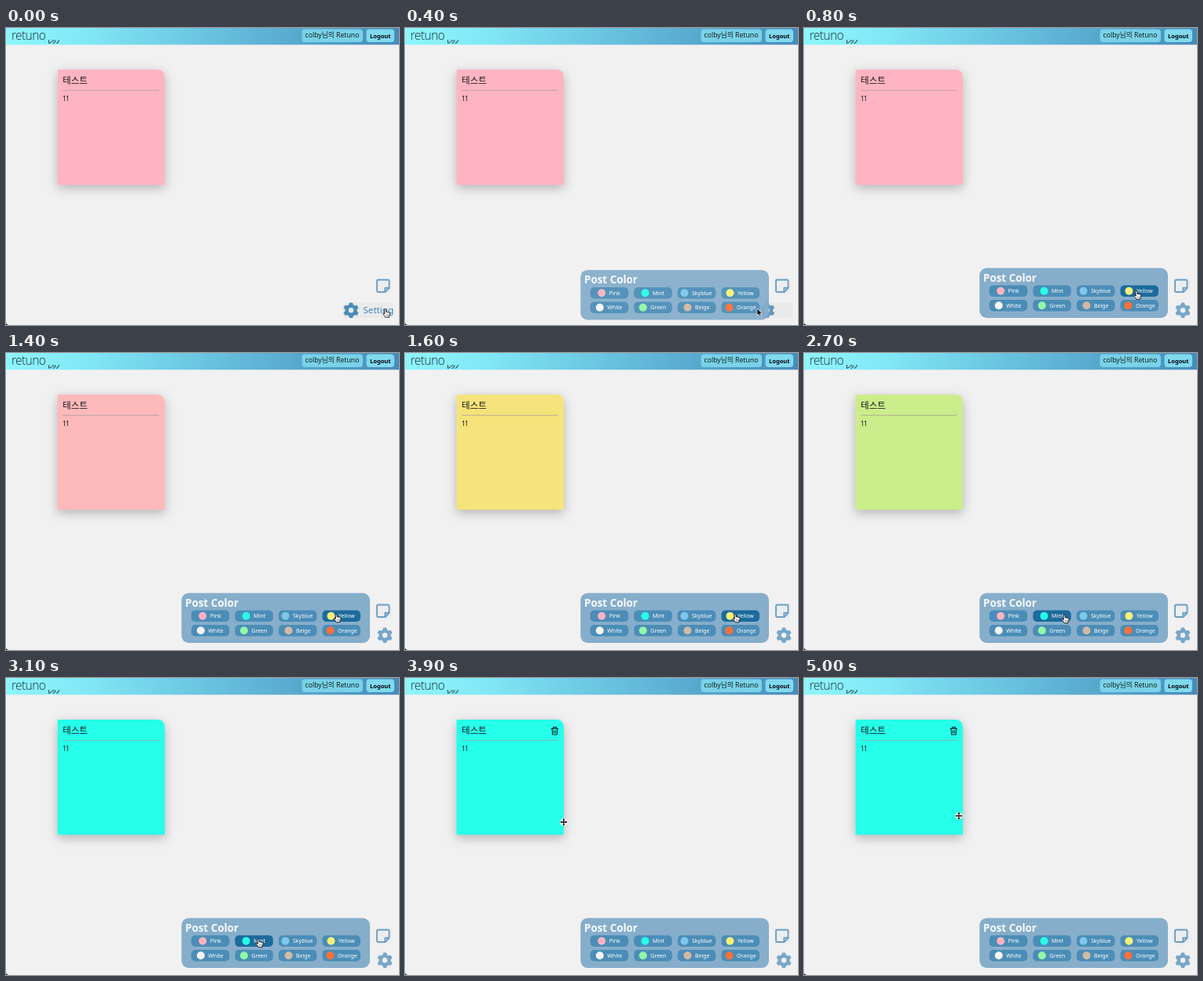
These frames come from a looping animation (500x378 px, 5.1 s). An HTML page:

```html
<!DOCTYPE html>
<html lang="ko">
<head>
<meta charset="utf-8">
<title>Sticky notes</title>
<style>
  html, body { margin: 0; width: 100%; height: 100%; overflow: hidden; background: #f2f1f2; }
  svg { display: block; width: 100vw; height: 100vh; }
  text { font-family: "Noto Sans", "Noto Sans CJK KR", "Noto Sans CJK", sans-serif; white-space: pre; }
  #note { filter: drop-shadow(0 4px 7px rgba(0, 0, 0, .26)); }
  .logo { font: 300 15.5px "Open Sans", Lato, sans-serif; letter-spacing: -.6px; fill: #17303a; }
  .kana { font: 700 6px "Noto Sans CJK JP", "Noto Sans CJK", sans-serif; letter-spacing: -1px; fill: #10242c; }
  .label { font-size: 7px; fill: #fff; }
</style>
</head>
<body>
<svg viewBox="0 0 500 378" xmlns="http://www.w3.org/2000/svg">
  <defs>
    <linearGradient id="bar">
      <stop offset="0" stop-color="#8ff5fd"/>
      <stop offset=".2" stop-color="#82e8f6"/>
      <stop offset=".6" stop-color="#62b9d9"/>
      <stop offset="1" stop-color="#478bb9"/>
    </linearGradient>
  </defs>
  <rect width="500" height="378" fill="#f2f1f2"/>

  <rect width="500" height="21.3" fill="url(#bar)"/>
  <text class="logo" x="7" y="15">retuno</text>
  <text class="kana" x="53" y="19.2">レツノ</text>
  <rect x="376.5" y="1.5" width="77.5" height="16.5" rx="4" fill="#79d2e8"/>
  <text x="415" y="12.3" font-size="8.7" text-anchor="middle" fill="#122">colby님의 Retuno</text>
  <rect x="458.5" y="1.5" width="35.5" height="16.5" rx="4" fill="#80daee"/>
  <text x="476.3" y="12.5" font-size="7.5" font-weight="600" text-anchor="middle" fill="#001">Logout</text>

  <path id="note" d="M65.6 53H192.5Q202 53 202 62.5V199.6H65.6Z"/>
  <text x="72" y="70.6" font-size="11.6" fill="#181818">테스트</text>
  <path d="M72 79.3H194.6" stroke="#a09a9a" stroke-opacity=".7"/>
  <text x="72" y="93.2" font-size="8.3" letter-spacing="-.8" fill="#181818">11</text>
  <g id="trash" fill="none" stroke="#0b2b2b" stroke-width="1.1">
    <path d="M185.8 64.5H195.2M188.5 64.3V62.6H192.5V64.3M187.2 64.8L187.7 72H193.3L193.8 64.8M189.5 66.5V70.3M191.5 66.5V70.3"/>
  </g>

  <rect x="469" y="318" width="22" height="21" rx="6" fill="#e9ebed" opacity=".7"/>
  <path d="M473.5 320.5H486Q487.5 320.5 487.5 322V331L482.5 336H473.5Q472 336 472 334.5V322Q472 320.5 473.5 320.5ZM487.5 330.8H482.3V336" fill="none" stroke="#6c9fc3" stroke-width="1.9" stroke-linejoin="round"/>

  <rect id="pill" y="349.5" height="20" rx="7" fill="#e9e9ea"/>
  <text id="setting" y="363.2" font-size="11.6" fill="#4185b6">Setting</text>
  <g id="gear" fill="#4a8bb8"></g>

  <g id="panel">
    <rect x="223.3" y="305.5" width="239.7" height="63.5" rx="9" fill="#86aecb"/>
    <text x="228" y="322.8" font-size="13.4" font-weight="600" fill="#f8fbfd">Post Color</text>
  </g>

  <path d="M0 375Q.3 377.7 4 378H0Z" fill="#111"/>

  <g id="cursor">
    <g id="arrow">
      <path d="M0 0V8.7L2 7 3.3 10 4.9 9.3 3.6 6.4H6.3Z" stroke="#fff" stroke-width=".7"/>
    </g>
    <g id="hand">
      <path d="M-1.2 1Q-1.2 0 -.2 0 .8 0 .9 1L1.3 4Q2 3.4 2.9 4.2 3.8 3.7 4.5 4.6 6 4.3 6.1 5.7 6.2 8 5 9.2V10.7H.2Q-.7 8.7 -2.8 6.7 -3.2 5.6 -2 5.5L-.5 6.5Z" fill="#fff" stroke="#111" stroke-width=".9" stroke-linejoin="round"/>
      <path d="M1.5 7V9M3 7V9M4.4 7V9" stroke="#222" stroke-width=".5"/>
    </g>
    <g id="move">
      <circle r="4.6" fill="#fff"/>
      <path d="M-4 0H4M0 -4V4" stroke="#000" stroke-width="1.2"/>
      <path d="M0 -4.4L1.6 -2.4H-1.6ZM0 4.4L1.6 2.4H-1.6ZM-4.4 0L-2.4 -1.6V1.6ZM4.4 0L2.4 -1.6V1.6Z"/>
    </g>
  </g>
</svg>
<script>
const LOOP = 5100;
const PINK = [255, 181, 193], YELLOW = [244, 233, 116], MINT = [38, 255, 233];
// name, dot colour, left edge of the label
const swatches = [
  ['Pink', '#f8b3c1', 259.7], ['Mint', '#26ffe9', 315], ['Skyblue', '#7dc8ea', 365], ['Yellow', '#f8f178', 423],
  ['White', '#f4f4f4', 257.3], ['Green', '#92f8a8', 312.3], ['Beige', '#d2b9a3', 369], ['Orange', '#ff7038', 422]
];
// time, x, y of the pointer tip
const pointerPath = [
  [0, 482.5, 357.5], [150, 482.5, 357.5], [400, 448, 357], [900, 420, 332], [1800, 420, 332],
  [2500, 331, 333], [2750, 331, 333], [3050, 321, 332], [3250, 321, 332],
  [4000, 196, 176], [4400, 196, 176], [4500, 197, 175.5], [LOOP, 197, 175.5]
];

const $ = id => document.getElementById(id);
const progress = (t, start, end) => Math.min(1, Math.max(0, (t - start) / (end - start)));
const smooth = u => u * u * (3 - 2 * u);
const easeOut = u => 1 - (1 - u) ** 2;
const mix = (a, b, u) => a + (b - a) * u;
const mixColor = (a, b, u) => a.map((v, i) => mix(v, b[i], u));
const show = (id, visible) => $(id).setAttribute('display', visible ? 'inline' : 'none');

function set(el, attrs) {
  for (const name in attrs) el.setAttribute(name, attrs[name]);
}

function add(parent, tag, attrs, text = '') {
  const el = document.createElementNS('http://www.w3.org/2000/svg', tag);
  set(el, attrs);
  el.textContent = text;
  return parent.appendChild(el);
}

const buttons = swatches.map(([name, color, textX], i) => {
  const x = 235.7 + (i % 4) * 55.6, y = i < 4 ? 327.5 : 346;
  const el = add($('panel'), 'rect', { x, y, width: 48.5, height: 14.5, rx: 5 });
  add($('panel'), 'circle', { cx: textX - 9.5, cy: y + 7.3, r: 5, fill: color });
  add($('panel'), 'text', { x: textX, y: y + 9.6, class: 'label' }, name);
  return { el, x, y };
});

add($('gear'), 'circle', { r: 5.4, fill: 'none', stroke: '#4a8bb8', 'stroke-width': 4.4 });
for (let i = 0; i < 6; i++)
  add($('gear'), 'path', { d: 'M-2.9 -6.5L-2 -9.8H2L2.9 -6.5Z', transform: `rotate(${i * 60})` });

function pointerAt(t) {
  const i = pointerPath.findIndex(p => p[0] > t);
  const [t0, x0, y0] = pointerPath[i - 1], [t1, x1, y1] = pointerPath[i];
  const u = smooth(progress(t, t0, t1));
  return [mix(x0, x1, u), mix(y0, y1, u)];
}

function render(t) {
  const [x, y] = pointerAt(t);

  const open = easeOut(progress(t, 100, 500));
  set($('panel'), { opacity: open, transform: `translate(0 ${40 * (1 - open)})` });

  const wide = 1 - smooth(progress(t, 200, 600));
  const gearX = mix(482, 439, wide);
  set($('gear'), { transform: `translate(${gearX} 359.3)`, opacity: mix(.72, 1, wide) });
  set($('setting'), { x: gearX + 15.5, opacity: Math.max(0, 2 * wide - 1) });
  set($('pill'), { x: gearX - 11, width: 505 - gearX, opacity: Math.min(.8, wide * 2) });

  let overButton = false;
  for (const b of buttons) {
    const over = open > .98 && x >= b.x && x <= b.x + 48.5 && y >= b.y && y <= b.y + 14.5;
    b.el.setAttribute('fill', over ? '#1c6b9c' : '#4b8db7');
    overButton ||= over;
  }

  const yellowed = mixColor(PINK, YELLOW, easeOut(progress(t, 1390, 1690)));
  const color = mixColor(yellowed, MINT, easeOut(progress(t, 2670, 2970)));
  $('note').setAttribute('fill', `rgb(${color.map(Math.round)})`);

  const overNote = x >= 65 && x <= 202 && y >= 53 && y <= 200;
  const hand = overButton || t < 250;
  show('trash', overNote);
  show('move', overNote);
  show('hand', hand);
  show('arrow', !hand && !overNote);
  $('cursor').setAttribute('transform', `translate(${x} ${y})`);
}

const start = performance.now();
function tick() {
  render((performance.now() - start) % LOOP);
  requestAnimationFrame(tick);
}
tick();
</script>
</body>
</html>
```
